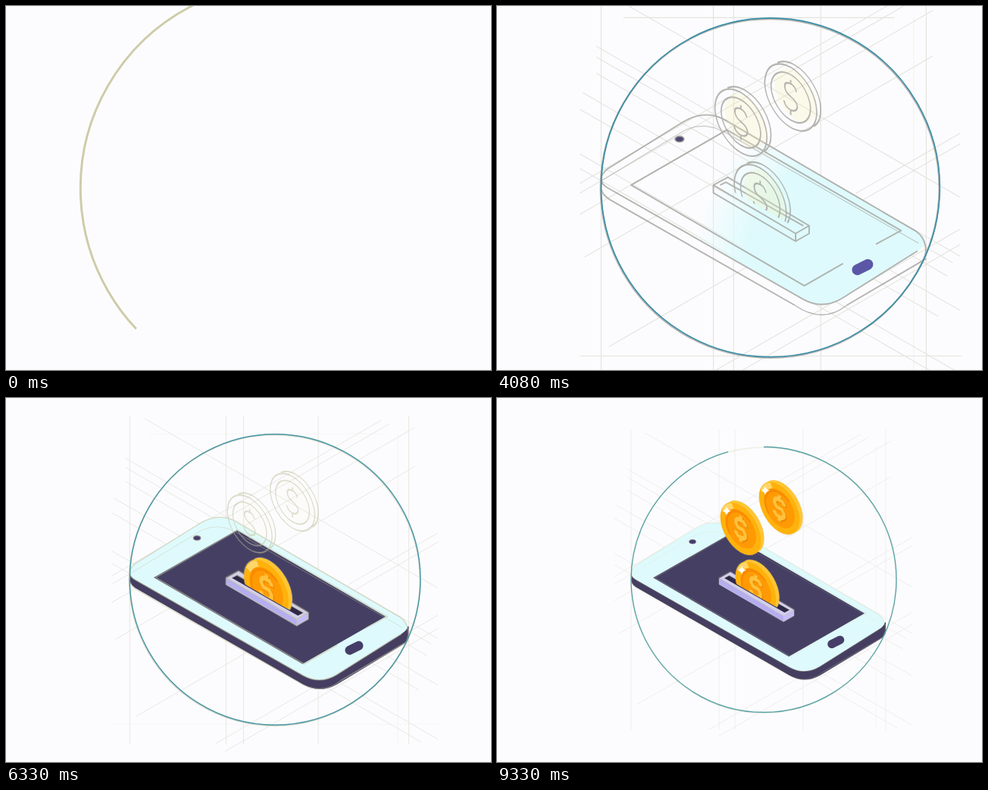
An HTML page that plays this animation: 640x480 px, repeating every 9410 ms.

```html
<!DOCTYPE html>
<html lang="en">
<head>
<meta charset="utf-8">
<title>Coins and phone</title>
<style>
html, body { margin: 0; width: 100%; height: 100%; overflow: hidden; background: #fcfcfe; }
svg { display: block; width: 640px; height: 480px; }
.line { fill: none; stroke-linecap: butt; stroke-linejoin: round; }
</style>
</head>
<body>
<svg viewBox="0 0 640 480">
  <defs>
    <clipPath id="topClip"><rect id="topWipe" width="640"/></clipPath>
    <clipPath id="rightClip"><rect id="rightWipe" width="640" height="480"/></clipPath>
    <clipPath id="slotClip"><path d="M0 0H640V432L0 63Z"/></clipPath>
    <clipPath id="riseClip"><rect id="rise"/></clipPath>
    <clipPath id="sideClip"><rect id="sideWipe" width="640" height="480"/></clipPath>
    <clipPath id="screenClip"><rect id="screenWipe" width="640" height="480"/></clipPath>
    <radialGradient id="soft"><stop offset=".7" stop-color="#fff"/><stop offset="1" stop-color="#fff" stop-opacity="0"/></radialGradient>
    <mask id="faceMask" maskUnits="userSpaceOnUse" x="0" y="0" width="640" height="480">
      <ellipse id="spread" cx="450" cy="323" fill="url(#soft)"/>
    </mask>
    <g id="coin">
      <path d="M-19 -24.8A31 31 0 0 1 24.8 19L19 24.8A31 31 0 0 1 -24.8 -19Z" fill="#ffc535"/>
      <g transform="translate(-2.9 2.9)">
        <circle r="31" fill="#ffb20c"/>
        <path class="line" d="M-25 -10A27 27 0 0 1 -12 -24" stroke="#ffd668" stroke-width="7"/>
        <circle r="23.5" fill="#ff9a04"/>
        <path class="line" d="M-16 15A22 22 0 0 1 15 -16" stroke="#f98a00" stroke-width="3"/>
        <use href="#dollar" transform="translate(1.5 1)" stroke="#ef8700" stroke-width="5.5"/>
        <use href="#dollar" stroke="#ffc23c" stroke-width="5"/>
      </g>
    </g>
    <path id="dollar" class="line" d="M7 -6V-8L4 -11H-4L-7 -8V-4L-4 0H4L7 4V8L4 11H-4L-7 8V6M0 -17V-11M0 11V17"/>
    <path id="star" d="M0 -6Q1 -1 6 0Q1 1 0 6Q-1 1 -6 0Q-1 -1 0 -6Z" fill="#fffdf2"/>
  </defs>
  <rect width="640" height="480" fill="#fcfcfe"/>
  <g id="guides" class="line" stroke="#d6d6cc" stroke-width=".9">
    <g clip-path="url(#topClip)"><g class="zoom" id="uprights"></g></g>
    <g clip-path="url(#rightClip)"><g class="zoom" id="slants"></g></g>
  </g>
  <g class="zoom">
    <g clip-path="url(#sideClip)">
      <path id="side" d="M177 231V241Q178 247 186 251L386 366Q406 377 426 366L504 319Q513 314 513 308V296L406 300Z" fill="#453e60"/>
    </g>
    <g id="face" mask="url(#faceMask)">
      <path d="M177 231Q177 225 184 220L258 174Q282 158 304 169L503 285Q520 295 504 305L426 354Q406 366 386 355L184 240Q177 236 177 231Z" fill="#dffafc"/>
    </g>
    <path clip-path="url(#screenClip)" d="M206 237L306 180L485 284L385 341Z" fill="#454063"/>
    <g id="slot">
      <path d="M293 238V246L378 295L392 287V280L378 287Z" fill="#b5aef0"/>
      <path d="M378 287V295L392 287V279.500Z" fill="#c4bdf6"/>
      <path d="M293 238L308 229.500L392 279.500L378 287.500Z" fill="#d3cfec"/>
      <path d="M300 237.500L306.500 234L386 279.500L379.500 283Z" fill="#2f2947"/>
    </g>
    <ellipse id="camera" cx="258" cy="189.500" rx="4.700" ry="3" fill="#453d6c"/>
    <path id="homeLine" class="line" d="M437 327Q436 322 442 319L452 314Q459 314 458 319Q457 322 451 326L444 329Q439 330 437 327" stroke="#a5dfc8" stroke-width="1" pathLength="1"/>
    <path id="home" class="line" d="M441.700 324.500L452.700 319" style="stroke-linecap:round"/>
    <g id="sketch" class="line"></g>
    <path id="hatch" class="line" d="M346 232l8 11M351 231l9 13M356 231l9 11M345 241l4 4" stroke="#e9e3b4" stroke-width="1.200"/>
    <path id="ring" class="line" d="M352 64.500A175 175 0 1 0 352.010 64.500" stroke-width="1.300" pathLength="1"/>
    <g clip-path="url(#slotClip)">
      <g transform="matrix(.866 .5 0 1 344 249)">
        <g clip-path="url(#riseClip)">
          <use href="#coin"/>
          <circle id="plain" cx="-2.900" cy="2.900" r="31" fill="#ff9a04"/>
        </g>
      </g>
      <g id="coinA"><use href="#coin" transform="matrix(.866 .5 0 1 0 0)"/></g>
      <g id="coinB"><use href="#coin" transform="matrix(.866 .5 0 1 0 0)"/></g>
      <g id="stars"></g>
    </g>
  </g>
</svg>
<script>
const NS = 'http://www.w3.org/2000/svg';
const $ = id => document.getElementById(id);
const FPS = 12, FRAMES = 113, LOOP = 9410;
const ISO = 'matrix(.866 .5 0 1 ';

function add(parent, tag, attrs) {
  const el = document.createElementNS(NS, tag);
  for (const k in attrs) el.setAttribute(k, attrs[k]);
  parent.appendChild(el);
  return el;
}
const set = (el, attrs) => { for (const k in attrs) el.setAttribute(k, attrs[k]); };
const ramp = (t, a, b) => Math.min(1, Math.max(0, (t - a) / (b - a)));
const smooth = p => p * p * (3 - 2 * p);

// piecewise linear value through [time, value] pairs
function key(t, pts) {
  if (t <= pts[0][0]) return pts[0][1];
  for (let i = 1; i < pts.length; i++) {
    const [a, u] = pts[i - 1], [b, v] = pts[i];
    if (t <= b) return u + (v - u) * (t - a) / (b - a);
  }
  return pts[pts.length - 1][1];
}

// smooth curve through the same kind of pairs, flat at both ends
function curve(t, pts) {
  const n = pts.length - 1;
  const slope = i => i === 0 || i === n ? 0
    : (pts[i + 1][1] - pts[i - 1][1]) / (pts[i + 1][0] - pts[i - 1][0]);
  let i = 0;
  while (i < n - 1 && t > pts[i + 1][0]) i++;
  const [a, u] = pts[i], [b, v] = pts[i + 1], d = b - a, p = ramp(t, a, b), q = 1 - p;
  return u * (1 + 2 * p) * q * q + v * p * p * (3 - 2 * p)
    + d * (slope(i) * p * q * q - slope(i + 1) * p * p * q);
}

const mix = (a, b, p) => 'rgb(' + a.map((v, i) => Math.round(v + (b[i] - v) * p)) + ')';

// construction lines
const guide = (parent, x1, y1, x2, y2) => add($(parent), 'path', { d: `M${x1} ${y1}L${x2} ${y2}` });
[177, 293, 314, 404, 513].forEach(x => guide('uprights', x, 42, x, 438));
add($('slants'), 'path', { d: 'M500 64V438', opacity: .4 });
const slant = (k, c, a, b) => guide('slants', a, c + k * (a - 320), b, c + k * (b - 320));
[[118, 195, 548], [179, 172, 548], [190, 172, 540], [207, 172, 535], [235, 158, 548],
 [254, 155, 525], [300, 155, 548], [315, 155, 528]].forEach(l => slant(.577, ...l));
[[140, 155, 480], [150, 155, 490], [172, 155, 520], [219, 160, 520], [315, 440, 548],
 [326, 185, 548], [414, 280, 548], [430, 292, 548]].forEach(l => slant(-.577, ...l));
const tangents = add($('slants'), 'path', { d: 'M200 64H480M155 413.500H550' });

// sketch strokes: path, start, end, width
const sketch = $('sketch'), strokes = [];
function stroke(parent, d, t0, t1, w = 1.5) {
  const el = add(parent, 'path', { d, pathLength: 1, 'stroke-width': w });
  strokes.push([el, t0, t1]);
}
const rough = add(sketch, 'g', { transform: 'translate(-.5 .8)' });
stroke(rough, 'M352 64.500A175 175 0 1 0 352.010 64.500', -.6, 1.02, 1.9);
[['M177 240V231Q177 225 184 220L258 174Q282 158 304 169', 1.85, 2.5],
 ['M509 318Q514 306 512 299Q510 290 503 285L304 169', 1.75, 2.53],
 ['M377 361Q406 381 431 361', 1.7, 2.05, 1.1],
 ['M177 231Q177 236 184 240L386 355Q406 366 426 354L504 305', 2.1, 2.7],
 ['M177 241Q178 247 186 252L377 361M431 361L513 313', 2.2, 2.8],
 ['M427 318L387 341L208 237L307 180L487 284L461 298', 2.2, 2.85],
 ['M178 232L264 180Q284 171 304 182L505 297', 2, 2.6, .7],
 ['M253.500 189.500a4.500 3 0 1 0 9 0a4.500 3 0 1 0 -9 0', 2.3, 2.6],
 ['M293 237L308 229L392 279L378 287ZV245L378 295V287M378 295L392 287V279', 2.2, 2.8],
 ['M300 237L306 234L386 279', 2.4, 2.8]
].forEach(s => stroke(sketch, ...s));

const tints = [];
function sketchCoin(x, y, t0, t1) {
  const outer = add(sketch, 'g', y > 240 ? { 'clip-path': 'url(#slotClip)' } : {});
  const g = add(outer, 'g', { transform: ISO + x + ' ' + y + ')' });
  tints.push(add(g, 'circle', { cx: 3, cy: -2, r: 25, fill: '#f4eaa0', stroke: 'none' }));
  const arc = (r, cx, cy) => {
    const k = r * .707;
    return `M${cx - k} ${cy - k}A${r} ${r} 0 1 1 ${cx - k - .01} ${cy - k + .01}`;
  };
  stroke(g, 'M-19 -24.800A31 31 0 0 1 24.800 19', t0, t0 + (t1 - t0) * .5);
  stroke(g, arc(31, -2.9, 2.9), t0, t1);
  stroke(g, arc(23.5, -2.9, 2.9), t0, t1);
  stroke(g, 'M4 -6Q2 -12 -4 -11Q-11 -10 -10 -4Q-9 1 -3 2Q5 4 5 9Q4 15 -3 16Q-10 16 -11 10M-3 -15V-11M-3 16V21',
    t0 + (t1 - t0) * .4, t1, 1.7);
}
sketchCoin(324, 171, 1.83, 2.6);
sketchCoin(375.5, 145, 1.3, 2.02);
sketchCoin(344, 249, 2.15, 2.85);

const stars = [[324, 171], [375, 144], [344, 249]].map(([x, y]) =>
  [add($('stars'), 'use', { href: '#star' }), x - 21, y - 22]);

const ZOOM = [[0, 1.545], [2.08, 1.458], [2.92, 1.386], [4.08, 1.277], [5.58, 1.146], [7.17, 1.054], [9.33, 1]];
const zooms = document.querySelectorAll('.zoom');

function fly(el, t, t0, t1, x, y) {
  const p = smooth(ramp(t, t0, t1));
  set(el, {
    transform: `translate(${344 + (x - 344) * p} ${249 + (y - 249) * p})`,
    visibility: t > t0 ? 'visible' : 'hidden'
  });
}

function draw(t) {
  const s = curve(t, ZOOM);
  zooms.forEach(z => z.setAttribute('transform', `translate(320 240) scale(${s}) translate(-320 -240)`));

  $('topWipe').setAttribute('height', key(t, [[1.2, 0], [2.08, 138], [2.75, 480]]));
  $('rightWipe').setAttribute('x', key(t, [[1.2, 640], [2.08, 462], [2.75, 80]]));
  $('guides').setAttribute('opacity', key(t, [[2, .5], [2.9, .62], [4, .62], [5.58, .58], [7.17, .5], [9.33, .42]]));
  tangents.setAttribute('opacity', 1 - ramp(t, 5.4, 6.8));

  for (const [el, a, b] of strokes) {
    const p = ramp(t, a, b);
    set(el, { 'stroke-dasharray': p < 1 ? p + ' 2' : 'none', visibility: p > 0 ? 'visible' : 'hidden' });
  }
  const cool = ramp(t, 1, 2.9), warm = ramp(t, 4.2, 7);
  set(sketch, {
    stroke: warm ? mix([158, 157, 152], [206, 205, 165], warm)
      : mix([200, 199, 160], [158, 157, 152], cool),
    opacity: key(t, [[0, .9], [2.9, .85], [4.08, .75], [5.58, .6], [7.17, .45], [9.33, .22]])
  });
  const tint = key(t, [[2.2, 0], [2.9, .3], [4.2, .3], [5.6, .16], [7, 0]]);
  tints.forEach((el, i) => el.setAttribute('opacity', i === 2 && t > 4.6 ? 0 : tint));
  $('hatch').setAttribute('opacity', key(t, [[1.8, 0], [2, .9], [2.3, .9], [2.6, 0]]));

  // ring grows counterclockwise and starts to leave the same way
  const grown = key(t, [[1.5, 0], [2.08, .327], [2.8, 1]]);
  const gone = Math.pow(ramp(t, 9.08, 9.3333), 2) * .0433;
  set($('ring'), {
    stroke: mix([56, 142, 168], [86, 160, 164], ramp(t, 4, 9)),
    'stroke-dasharray': gone ? `0 ${gone} ${1 - gone} 2` : grown < 1 ? grown + ' 2' : 'none',
    visibility: grown > 0 ? 'visible' : 'hidden'
  });

  // phone fills
  const reach = key(t, [[2.75, 0], [2.92, 34], [4.08, 178], [5.1, 430]]);
  set($('spread'), { rx: reach, ry: reach * key(t, [[2.92, .55], [4.08, 1]]) });
  $('face').setAttribute('opacity', key(t, [[2.75, .3], [2.92, .65], [3.4, 1]]));
  $('sideWipe').setAttribute('y', key(t, [[4.2, 380], [5.2, 220]]));
  $('screenWipe').setAttribute('y', key(t, [[4.5, 342], [5.58, 193], [5.75, 175]]));
  $('slot').setAttribute('opacity', ramp(t, 4.8, 5.25));
  $('camera').setAttribute('opacity', ramp(t, 3.8, 4.1));
  const outline = ramp(t, 2.6, 3);
  set($('homeLine'), {
    'stroke-dasharray': outline + ' 2',
    visibility: outline > 0 && t < 3.7 ? 'visible' : 'hidden'
  });
  const pill = ramp(t, 3.2, 3.6);
  set($('home'), {
    'stroke-width': 11 * pill,
    stroke: mix([91, 87, 166], [69, 62, 104], ramp(t, 4.1, 5.3)),
    visibility: pill > 0 ? 'visible' : 'hidden'
  });

  // coins
  const half = Math.max(0, 23 + (t - 5.5833) * 60);
  set($('rise'), {
    x: -2.5 - half, width: 2 * half, height: 80,
    y: key(t, [[5.4, 13], [5.5833, -2.4], [6, -38]])
  });
  $('plain').setAttribute('opacity', 1 - ramp(t, 5.65, 6.1));
  fly($('coinB'), t, 6.75, 7.583, 375, 144);
  fly($('coinA'), t, 7.5, 8.333, 324, 171);
  stars.forEach(([el, x, y], i) => {
    const k = smooth(ramp(t, 8.4 + i * .12, 8.8 + i * .12));
    el.setAttribute('transform', `translate(${x} ${y}) scale(${k})`);
  });
}

const start = performance.now();
function tick() {
  const ms = (performance.now() - start) % LOOP;
  draw(Math.min(FRAMES - 1, Math.floor((ms + 4) * FPS / 1000)) / FPS);
  requestAnimationFrame(tick);
}
tick();
</script>
</body>
</html>
```
